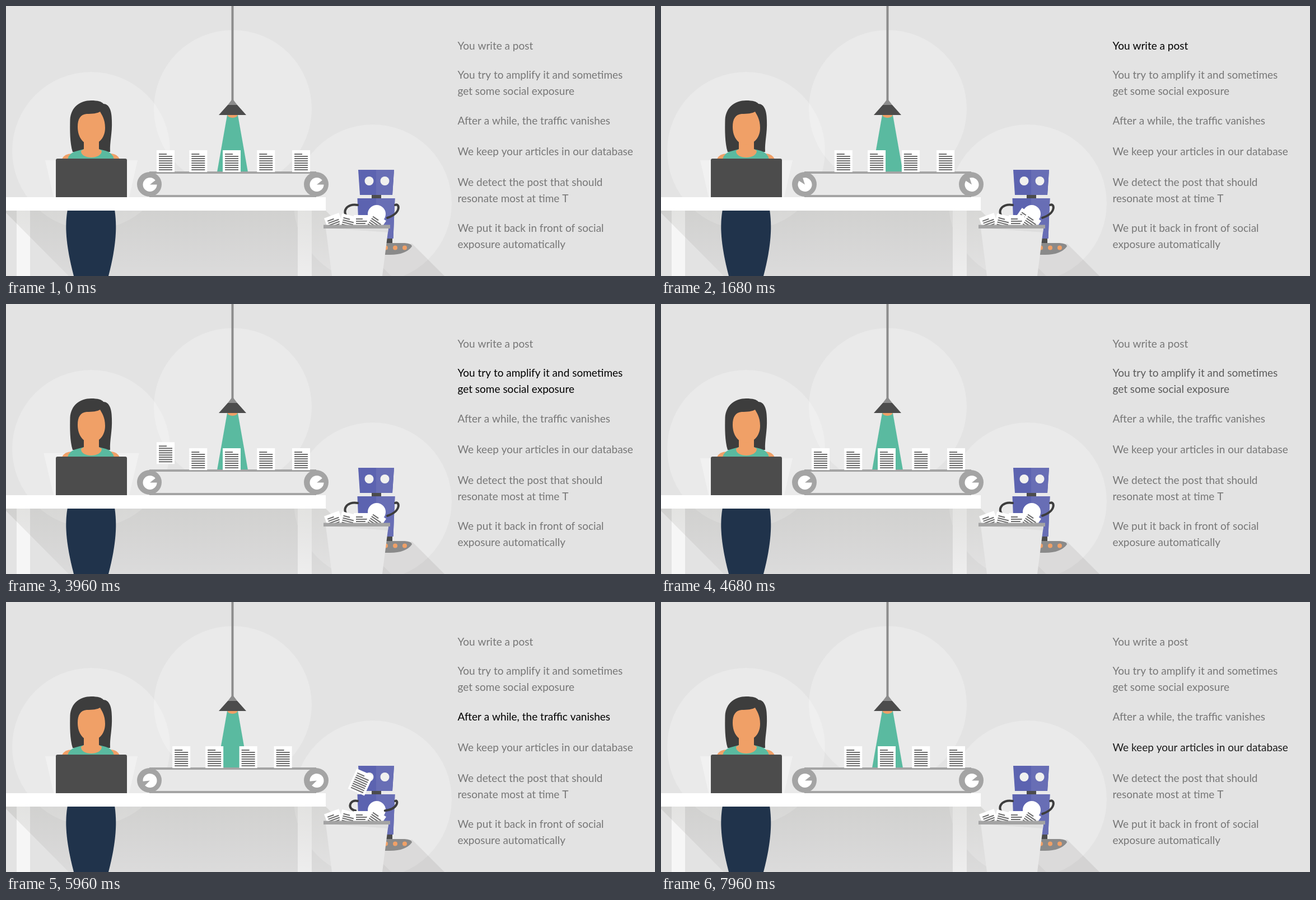
An HTML page with a canvas for the animation above (8 s loop, 1159 by 483 pixels).

```html
<!DOCTYPE html>
<html lang="en">
<head>
<meta charset="utf-8">
<title>Content cycle</title>
<style>
  html, body { margin: 0; width: 100%; height: 100%; overflow: hidden; background: #e3e3e3; }
  canvas { display: block; }
</style>
</head>
<body>
<canvas id="stage" width="1159" height="483"></canvas>
<script>
const ctx = document.getElementById('stage').getContext('2d');
const LOOP = 8000, CYCLE = 4800, MOVE = 2400;
const ORANGE = '#f0a067', TEAL = '#5abaa0', DARK = '#4c4c4c', GREY = '#a4a4a4', HAIR = '#3d3d3d';
const BLUE = '#5c63b0', PALE_BLUE = '#686eb5', LINE_HEIGHT = 29;

const CAPTIONS = [
  [78, 'You write a post'],
  [130, 'You try to amplify it and sometimes', 'get some social exposure'],
  [212, 'After a while, the traffic vanishes'],
  [267, 'We keep your articles in our database'],
  [322, 'We detect the post that should', 'resonate most at time T'],
  [404, 'We put it back in front of social', 'exposure automatically']
];

const clamp = v => Math.max(0, Math.min(1, v));
const lerp = (a, b, k) => a + (b - a) * k;
const slot = i => 285 + i * (57.5 + .75 * i);

function poly(fill, ...p) {
  ctx.fillStyle = fill;
  ctx.beginPath();
  for (let i = 0; i < p.length; i += 2) ctx.lineTo(p[i], p[i + 1]);
  ctx.fill();
}

// upright trapezoid around a centre line
function taper(fill, x, top, bottom, halfTop, halfBottom = halfTop) {
  poly(fill, x - halfTop, top, x + halfTop, top, x + halfBottom, bottom, x - halfBottom, bottom);
}

function rect(fill, x0, y0, x1, y1) {
  ctx.fillStyle = fill;
  ctx.fillRect(x0, y0, x1 - x0, y1 - y0);
}

function oval(fill, x, y, rx, ry = rx) {
  ctx.fillStyle = fill;
  ctx.beginPath();
  ctx.ellipse(x, y, rx, ry, 0, 0, 7);
  ctx.fill();
}

function shape(fill, d) {
  ctx.fillStyle = fill;
  ctx.fill(new Path2D(d));
}

function sheet(x, y, deg = 0, w = 32, h = 39) {
  ctx.save();
  ctx.translate(x, y);
  ctx.rotate(deg * Math.PI / 180);
  rect('#fff', -w / 2, -h / 2, w / 2, h / 2);
  for (let ly = 6; ly < h - 3; ly += 4)
    rect('#6c6c6c', 4 - w / 2, ly - h / 2, ly > 6 ? w / 2 - 4 : 2, ly + 2 - h / 2);
  ctx.restore();
}

function drawRoom() {
  rect('#e3e3e3', 0, 0, 1159, 483);
  for (const [x, y] of [[152, 259], [405, 184], [655, 353]])
    oval('rgba(255,255,255,.24)', x, y, 141);

  rect('#f6f6f6', 19, 366, 43, 483);
  rect('#f6f6f6', 521, 366, 546, 483);
  const shade = ctx.createLinearGradient(0, 366, 0, 483);
  shade.addColorStop(0, 'rgba(20,20,0,.085)');
  shade.addColorStop(1, 'rgba(10,0,0,.035)');
  poly(shade, 0, 370, 0, 366, 571, 366, 688, 483, 112, 483);
  poly('rgba(20,0,0,.07)', 672, 436, 725, 425, 783, 483, 672, 483);
}

function drawWoman(flare) {
  const lift = 31 * flare;
  taper('rgba(255,255,255,.33)', 152.5, 276 - lift, 342, 82.5 + lift * .3, 67.5);

  shape('#20334b', 'M110 364H194C198 392 198 425 183 483H121C106 425 105 392 110 364Z');
  shape(HAIR, 'M119 261C114 245 114 222 114.5 203C116 181 132 169 152 169C164 169 171 171 174 175C184 175 189 187 189 205C190 228 185 243 186 261Z');
  shape(ORANGE, 'M100 274Q104 264 118 264H188Q199 265 203 274Z');
  shape(TEAL, 'M110 274Q113 262 128 259L139 256H166L178 259Q190 262 193 274Z');
  shape(ORANGE, 'M139 243H166V256L171 259C171 275 133 275 134 259L139 256Z');
  shape(ORANGE, 'M128 216C128 202 133 194 144 193C155 193 163 192 168 189C171 195 177 202 177 218C177 236 165 248 152 248C139 248 128 236 128 216Z');
  shape(DARK, 'M89 342V276Q89 273 92 273H213Q216 273 216 276V342Z');
  rect('#fff', 0, 342, 571, 366);
}

function drawLamp() {
  taper(TEAL, 404.5, 195, 297, 9.5, 27.5);
  taper('#8c8c8c', 404.5, 0, 170, 2);
  oval(ORANGE, 404.5, 195, 9, 5);
  taper('#8c8c8c', 404.5, 166, 177, 0, 8.5);
  taper(DARK, 404.5, 177, 195, 8.5, 24.5);
}

function drawBelt(turn) {
  rect('#e8e8e8', 256, 299, 554, 340);
  rect(GREY, 256, 296, 554, 300);
  rect(GREY, 256, 338, 554, 342);
  for (const x of [256, 554]) {
    oval(GREY, x, 319, 22);
    ctx.fillStyle = '#fff';
    ctx.beginPath();
    ctx.moveTo(x + 1, 319.5);
    ctx.arc(x + 1, 319.5, 12.5, turn, turn + Math.PI * 2 - .68);
    ctx.fill();
  }
}

function drawSheets(p) {
  const k = clamp(p / MOVE);
  for (let i = 0; i < 4; i++) sheet(lerp(slot(i), slot(i + 1), k), 277.5);
  const drop = clamp((p - 3680) / 480);
  ctx.globalAlpha = clamp(drop * 3);
  sheet(slot(0), 277.5 - 26 * (1 - drop));
  ctx.globalAlpha = 1;
}

function arm(shoulder, reach, hand, swing) {
  const r = reach * (1 - .35 * swing);
  ctx.beginPath();
  ctx.moveTo(shoulder, 356);
  ctx.bezierCurveTo(shoulder + r * .75, 352, shoulder + r * 1.2, 370,
    hand - reach * .45 * swing, 379 - 6 * swing);
  ctx.stroke();
}

function drawRobot(swing) {
  shape('#8a8a8a', 'M660 424H712Q725 425 725 430Q714 445 686 445H660Z');
  for (let i = 0; i < 3; i++) oval(ORANGE, 678 + 17 * i, 432.5, 4);
  taper(DARK, 661.5, 337, 345, 8.5);
  taper(DARK, 670, 415, 424, 20);
  for (const [top, bottom, half] of [[293, 338, 32], [344, 416, 33.5]]) {
    taper(BLUE, 661, top, bottom, half, half - 3);
    poly(PALE_BLUE, 661, top, 661 + half, top, 658 + half, bottom, 661, bottom);
  }
  oval('#f1f1ef', 648.5, 313, 8);
  oval('#f1f1ef', 676.5, 313, 8);
  oval('#fff', 662, 372, 16);

  ctx.strokeStyle = HAIR;
  ctx.lineWidth = 4;
  ctx.lineCap = 'round';
  arm(628, -26, 613, swing);
  arm(695, 10, 681, swing);
}

function drawFalling(p) {
  if (p > 1900) return;
  const u = p / 880, glide = clamp(p / 1600) ** 1.15;
  sheet(527 + 120 * Math.sin(glide * Math.PI / 2), 277.5 + 23 * u ** 2.4, 18 * u);
}

function drawBin(p) {
  ctx.save();
  ctx.beginPath();
  ctx.rect(480, 0, 230, 393);
  ctx.clip();
  drawFalling(p);
  [-20, 14, 0, 34].forEach((deg, i) => sheet(586 + 24.5 * i, 388, deg, 28, 28));
  ctx.restore();
  taper('#e8e8e8', 627, 397, 483, 56, 45);
  poly('#dedede', 571, 397, 683, 397, 682, 405);
  rect(GREY, 567, 391.5, 686, 398);
}

function drawCaptions(t) {
  ctx.font = '19px Lato, "Open Sans", sans-serif';
  CAPTIONS.forEach(([y, ...lines], i) => {
    const age = t - i * MOVE;
    const lit = clamp(Math.min(age / 1000, (MOVE - age) / 500));
    const c = Math.round(119 * (1 - lit));
    ctx.fillStyle = `rgb(${c},${c},${c})`;
    lines.forEach((text, n) => ctx.fillText(text, 806.5, y + n * LINE_HEIGHT));
  });
}

function draw(t) {
  const p = t % CYCLE;
  const flare = clamp(1 - Math.abs(t % 1600 - 620) / 200);
  const swing = Math.sin(Math.PI * (t % 800) / 800) ** 4;
  drawRoom();
  drawWoman(flare);
  drawLamp();
  drawBelt(clamp(p / MOVE) * Math.PI * 2);
  drawSheets(p);
  drawRobot(swing);
  drawBin(p);
  drawCaptions(t);
}

const start = performance.now();
function tick() {
  draw((performance.now() - start) % LOOP);
  requestAnimationFrame(tick);
}
tick();
</script>
</body>
</html>
```
